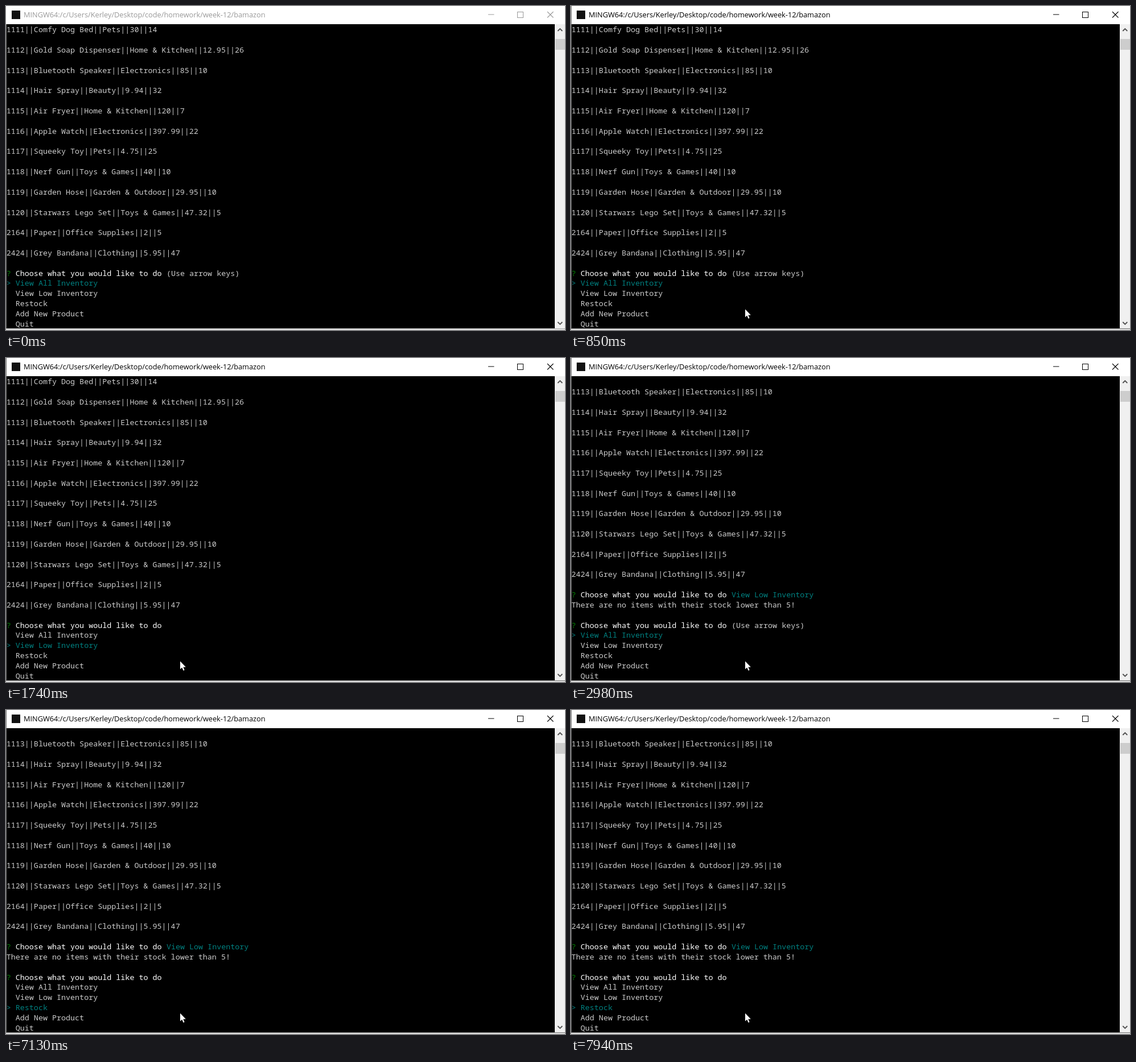
Write an HTML page with a canvas that moves like this. It is 982 by 570 pixels and loops after 8000 ms.

```html
<!DOCTYPE html>
<html lang="en">
<head>
<meta charset="utf-8">
<title>Terminal</title>
<style>
  html, body { margin: 0; width: 100%; height: 100%; overflow: hidden; background: #fff; }
  canvas { display: block; }
</style>
</head>
<body>
<canvas id="stage" width="982" height="570"></canvas>
<script>
const ctx = document.getElementById("stage").getContext("2d");
const LOOP = 8000, FOCUS = 800;
const COL = 8.034, ROW = 17.84;
const GREY = "#ccc", TEAL = "#008080", GREEN = "#008000", WHITE = "#fff";

const items = [
  "1111||Comfy Dog Bed||Pets||30||14",
  "1112||Gold Soap Dispenser||Home & Kitchen||12.95||26",
  "1113||Bluetooth Speaker||Electronics||85||10",
  "1114||Hair Spray||Beauty||9.94||32",
  "1115||Air Fryer||Home & Kitchen||120||7",
  "1116||Apple Watch||Electronics||397.99||22",
  "1117||Squeeky Toy||Pets||4.75||25",
  "1118||Nerf Gun||Toys & Games||40||10",
  "1119||Garden Hose||Garden & Outdoor||29.95||10",
  "1120||Starwars Lego Set||Toys & Games||47.32||5",
  "2164||Paper||Office Supplies||2||5",
  "2424||Grey Bandana||Clothing||5.95||47"
];
const options = ["View All Inventory", "View Low Inventory", "Restock", "Add New Product", "Quit"];

// [start, selected option]; -1 is the blank moment while the menu redraws
const menuStates = [
  [0, 0], [1700, -1], [1740, 1], [2980, 0], [6730, -1], [6770, 1],
  [7090, -1], [7130, 2], [7490, -1], [7530, 3], [7910, -1], [7940, 2]
];
const ANSWERED = 2980;
const hintShown = t => t < 1700 || (t >= ANSWERED && t < 6730);

function rect(color, x, y, w, h) {
  ctx.fillStyle = color;
  ctx.fillRect(x, y, w, h);
}

function line(color, width, ...points) {
  ctx.strokeStyle = color;
  ctx.lineWidth = width;
  ctx.beginPath();
  points.forEach(([x, y]) => ctx.lineTo(x, y));
  ctx.stroke();
}

function print(text, col, row, color = GREY) {
  ctx.fillStyle = color;
  ctx.fillText(text, 0.7 + col * COL, 46.4 + row * ROW);
}

function question(row, tail, tailColor) {
  print("?", 0, row, GREEN);
  print("Choose what you would like to do", 2, row, WHITE);
  print(tail, 35, row, tailColor);
}

function terminal(t) {
  rect("#000", 1, 32, 963, 536);
  ctx.font = '500 13.39px "Noto Sans Mono", "DejaVu Sans Mono", monospace';
  const answered = t >= ANSWERED;
  items.forEach((item, i) => print(item, 0, i * 2 - (answered ? 3 : 0)));
  if (answered) {
    question(21, "View Low Inventory", TEAL);
    print("There are no items with their stock lower than 5!", 0, 22);
  }
  const selected = menuStates.filter(([start]) => start <= t).pop()[1];
  if (selected < 0) return;
  question(24, hintShown(t) ? "(Use arrow keys)" : "", GREY);
  options.forEach((option, i) => print(option, 2, 25 + i, i === selected ? TEAL : GREY));
  print(">", 0, 25 + selected, TEAL);
}

function frame(focused) {
  const ink = focused ? "#000" : "#999";
  rect("#fff", 0, 0, 982, 32);
  rect("#111", 10, 8, 15, 15);
  ctx.font = '12.76px "Open Sans", "Noto Sans", sans-serif';
  ctx.fillStyle = ink;
  ctx.fillText("MINGW64:/c/Users/Kerley/Desktop/code/homework/week-12/bamazon", 31, 20.3);
  line(ink, 1, [847, 15], [857.5, 15]);
  ctx.strokeRect(898.5, 10.5, 10, 10);
  line(ink, 1.1, [951, 10], [961.5, 20.5]);
  line(ink, 1.1, [961.5, 10], [951, 20.5]);

  rect("#f0f0f0", 964, 32, 18, 536);
  rect("#cdcdcd", 965, 58, 17, 19);
  line("#505050", 1.8, [969.3, 44], [973.3, 40], [977.3, 44]);
  line("#505050", 1.8, [969.3, 556], [973.3, 560], [977.3, 556]);

  const top = focused ? 0 : 32;
  rect("#777", 0, top, 1, 568 - top);
  rect(focused ? "#777" : "#aaa", 0, 567, 982, 1);
  rect("#ddd", 0, 568, 982, 2);
}

// Stepped move between two points
function glide(t, start, stepTime, steps, [x0, y0], [x1, y1]) {
  const p = Math.max(0, Math.min(1, Math.floor((t - start) / stepTime) / steps));
  return [x0 + (x1 - x0) * p, y0 + (y1 - y0) * p];
}

function pointer(t) {
  if (t < 320) return;
  const rest = [349, 537];
  const [x, y] = t < 610
    ? glide(t, 320, 30, 2, [602, 560], rest)
    : glide(t, 562, 48, 4, rest, [306, 533.5]);
  ctx.save();
  ctx.translate(x, y);
  ctx.fillStyle = WHITE;
  ctx.fill(new Path2D("M0 0V14L3.2 11L5.5 16.5L7.6 15.6L5.3 10.2H9.8Z"));
  ctx.restore();
}

function draw(now) {
  const t = now % LOOP;
  terminal(t);
  frame(t >= FOCUS);
  pointer(t);
  requestAnimationFrame(draw);
}
draw(0);
</script>
</body>
</html>
```
